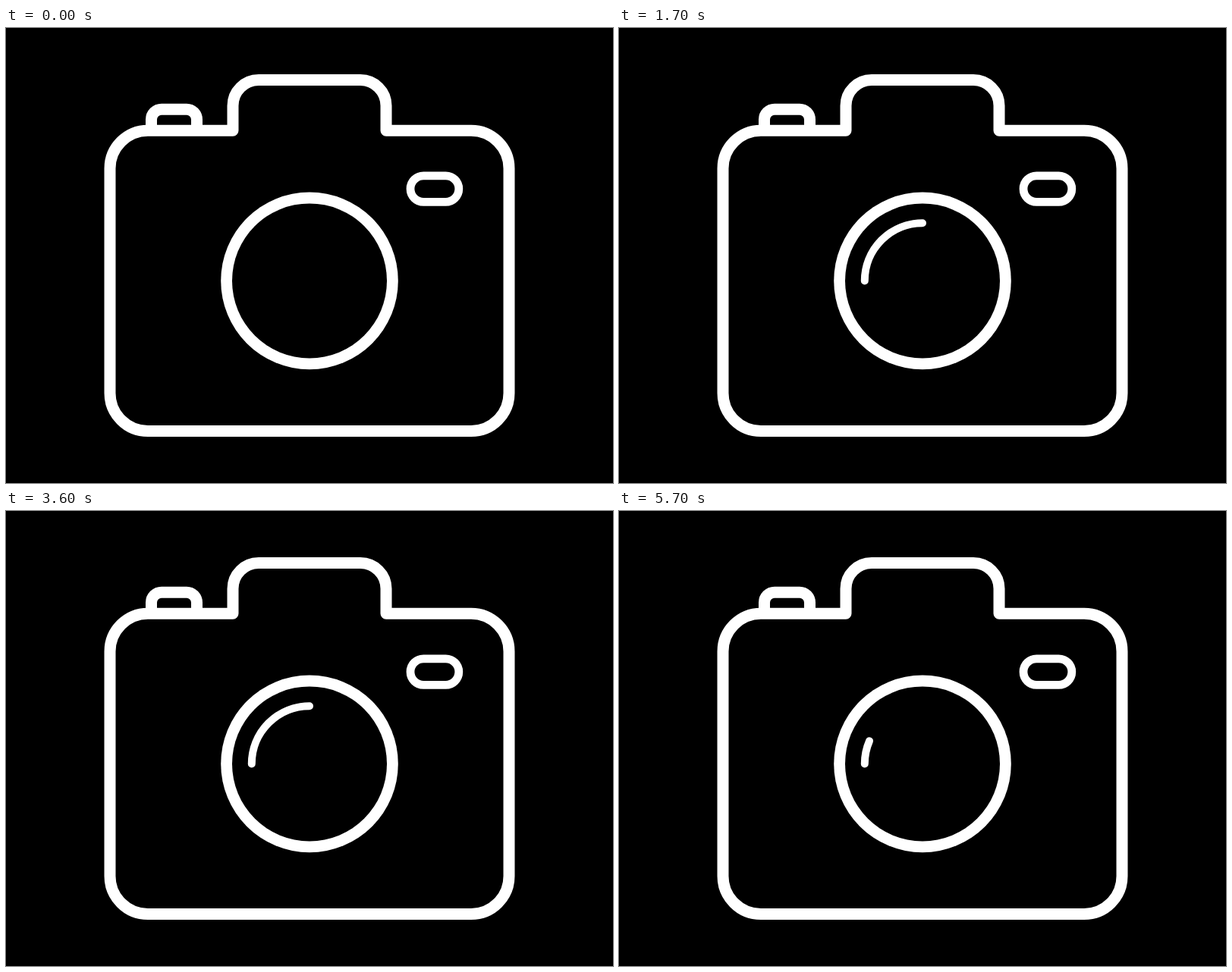
These frames come from a looping animation (800x600 px, 5730 ms). An HTML page:

```html
<!DOCTYPE html>
<html lang="en">
<head>
<meta charset="utf-8">
<title>Camera</title>
<style>
  html, body { margin: 0; width: 100%; height: 100%; overflow: hidden; background: #000; }
  svg { display: block; width: 800px; height: 600px; }
  .line { fill: none; stroke: #fff; stroke-width: 15; stroke-linejoin: round; }
  #glint { stroke-width: 10; stroke-linecap: round; }
</style>
</head>
<body>
<svg viewBox="0 0 800 600">
  <clipPath id="opening"><circle cx="400" cy="333.4" r="102"/></clipPath>
  <path id="button" class="line" d="M191.5 128V120.7A13.5 13.5 0 0 1 205 107.2H238A13.5 13.5 0 0 1 251.5 120.7V128"/>
  <path class="line" d="M299 135.2V102.5A34 34 0 0 1 333 68.5H467A34 34 0 0 1 501 102.5V135.2H613A50 50 0 0 1 663 185.2V481.5A50 50 0 0 1 613 531.5H187A50 50 0 0 1 137 481.5V185.2A50 50 0 0 1 187 135.2Z"/>
  <rect class="line" x="533" y="194.8" width="63.8" height="34.6" rx="17.3" style="stroke-width:10.8"/>
  <circle cx="400" cy="333.4" r="116.8" fill="#fff"/>
  <g clip-path="url(#opening)"><path id="iris"/></g>
  <path id="glint" class="line"/>
</svg>
<script>
const LOOP = 5730, CX = 400, CY = 333.4, OPEN = 130, SHUT = 28, GLINT = 76.2;
const [button, iris, glint] = ['button', 'iris', 'glint'].map(id => document.getElementById(id));

const ramp = (t, from, to) => Math.min(1, Math.max(0, (t - from) / (to - from)));
const pulse = (t, a, b, c, d) => ramp(t, a, b) - ramp(t, c, d);

// Each phase returns only the parts it moves; poses are held for 100 ms.
const snap = t => ({
  press: 14 * pulse(t, -50, 100, 200, 400),
  closed: pulse(t, 57, 200, 200, 422)
});
const sweep = t => ({
  tail: 270 * ramp(t, 221, 600),
  head: 270 * ramp(t, -74, 570) ** 1.12
});
const flick = t => ({
  tail: 90 * ramp(t, 130, 400),
  head: 90 * ramp(t, -20, 130)
});

const phases = [
  { move: snap, starts: [270, 2170, 4100], end: 400, shift: 0 },
  { move: sweep, starts: [900, 2800, 4730], end: 570, shift: 0 },
  { move: flick, starts: [1530, 3470, 5370], end: 400, shift: 30 }
];

function hold(t, { end, shift }) {
  if (t >= end) return end;
  return Math.max(0, Math.floor((t - shift) / 100) * 100 + shift);
}

function poseAt(time) {
  let pose = {}, latest = -1;
  for (const phase of phases) {
    for (const start of phase.starts) {
      if (start > time || start < latest) continue;
      latest = start;
      pose = phase.move(hold(time - start, phase));
    }
  }
  return { press: 0, closed: 0, tail: 0, head: 0, ...pose };
}

// Degrees run counterclockwise from the top of the lens.
function polar(deg, r) {
  const a = deg * Math.PI / 180;
  return `${CX - r * Math.sin(a)} ${CY - r * Math.cos(a)}`;
}

function hexagon(closed) {
  const r = OPEN + (SHUT - OPEN) * closed;
  const turn = 89 * closed - 34;
  return 'M' + Array.from({ length: 6 }, (_, i) => polar(i * 60 - turn, r)).join('L') + 'Z';
}

function arc(tail, head) {
  if (head <= tail) return '';
  const large = head - tail > 180 ? 1 : 0;
  return `M${polar(tail, GLINT)}A${GLINT} ${GLINT} 0 ${large} 0 ${polar(head, GLINT)}`;
}

const begin = performance.now();
function tick() {
  const { press, closed, tail, head } = poseAt((performance.now() - begin) % LOOP);
  button.setAttribute('transform', `translate(0 ${press})`);
  iris.setAttribute('d', hexagon(closed));
  glint.setAttribute('d', arc(tail, head));
  requestAnimationFrame(tick);
}
tick();
</script>
</body>
</html>
```
